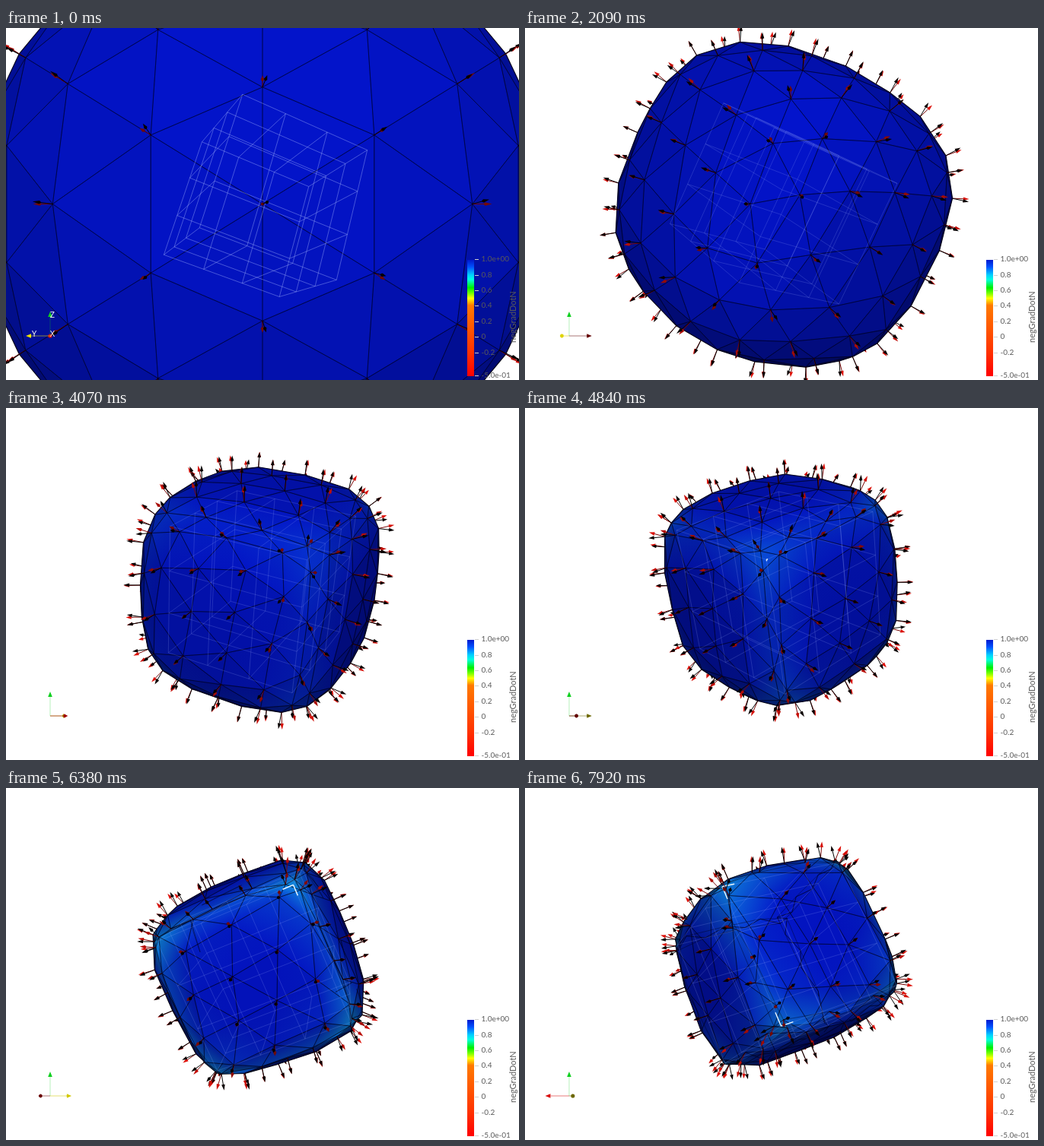
Recreate the animation shown at these times as an HTML page with a canvas. Size 674x463 px, loop 8000 ms.

```html
<!DOCTYPE html>
<html lang="en">
<head>
<meta charset="utf-8">
<title>Sphere shrinking onto a cube</title>
<style>
html, body { margin: 0; width: 100%; height: 100%; overflow: hidden; background: #fff; }
canvas { display: block; width: 674px; height: 463px; }
</style>
</head>
<body>
<canvas id="stage" width="674" height="463"></canvas>
<script>
const ctx = document.getElementById('stage').getContext('2d');
const LOOP = 8000, STEP = 110, TURN = 3.6 * Math.PI / 180;
const CX = 337, CY = 231.5, EYE = 864, UNIT = 88, ARROW = 0.235;
const LIGHT = [0, 0.3, 0.95];

// Vectors are [right, up, towards the viewer].
const dot = (a, b) => a[0] * b[0] + a[1] * b[1] + a[2] * b[2];
const add = (a, b, k = 1) => a.map((x, i) => x + k * b[i]);
const mul = (a, k) => a.map(x => x * k);
const unit = a => mul(a, 1 / (Math.hypot(...a) || 1));
const cross = (a, b) => [a[1] * b[2] - a[2] * b[1], a[2] * b[0] - a[0] * b[2], a[0] * b[1] - a[1] * b[0]];

// Cube axes at the start of the turn
const N = unit([-0.36, -0.24, -0.9]);
const V = unit(cross([-0.885, 0.36, 0.27], N));
const U = cross(N, V);
const AXES = [N, U, V];
const toCube = p => AXES.map(a => dot(p, a));
const fromCube = q => add(add(mul(N, q[0]), U, q[1]), V, q[2]);

function buildSphere(levels) {
  const phi = (1 + Math.sqrt(5)) / 2, verts = [];
  for (const s of [1, -1]) for (const t of [phi, -phi])
    verts.push([s, t, 0], [t, 0, s], [0, s, t]);
  const near = (i, j) => Math.hypot(...add(verts[i], verts[j], -1)) < 2.1;
  let faces = [];
  for (let i = 0; i < 12; i++) for (let j = i + 1; j < 12; j++) for (let k = j + 1; k < 12; k++)
    if (near(i, j) && near(j, k) && near(i, k)) {
      const n = cross(add(verts[j], verts[i], -1), add(verts[k], verts[i], -1));
      faces.push(dot(n, verts[i]) > 0 ? [i, j, k] : [i, k, j]);
    }
  verts.forEach((p, i) => { verts[i] = unit(p); });
  for (let l = 0; l < levels; l++) {
    const seen = {};
    const mid = (a, b) => {
      const key = Math.min(a, b) + ':' + Math.max(a, b);
      if (!(key in seen)) seen[key] = verts.push(unit(add(verts[a], verts[b]))) - 1;
      return seen[key];
    };
    faces = faces.flatMap(([a, b, c]) => {
      const ab = mid(a, b), bc = mid(b, c), ca = mid(c, a);
      return [[a, ab, ca], [ab, b, bc], [ca, bc, c], [ab, bc, ca]];
    });
  }
  return { dirs: verts.map(toCube), faces };
}
const sphere = buildSphere(2);

let cosA = 1, sinA = 0;
const spin = p => [p[0] * cosA - p[2] * sinA, p[1], p[2] * cosA + p[0] * sinA];
const view = q => spin(fromCube(q));
function project(p) {
  const k = UNIT * EYE / (EYE - p[2] * UNIT);
  return [CX + p[0] * k, CY - p[1] * k];
}

function line(a, b) {
  ctx.beginPath();
  ctx.moveTo(a[0], a[1]);
  ctx.lineTo(b[0], b[1]);
  ctx.stroke();
}
function tracePoly(pts) {
  pts.forEach((p, i) => i ? ctx.lineTo(p[0], p[1]) : ctx.moveTo(p[0], p[1]));
  ctx.closePath();
}
function disc(p, r) {
  ctx.beginPath();
  ctx.arc(p[0], p[1], r, 0, 7);
  ctx.fill();
}
function cone(base, tip, w) {
  const dx = tip[0] - base[0], dy = tip[1] - base[1], d = Math.hypot(dx, dy) || 1;
  const ox = -dy / d * w, oy = dx / d * w;
  ctx.beginPath();
  tracePoly([tip, [base[0] + ox, base[1] + oy], [base[0] - ox, base[1] - oy]]);
  ctx.fill();
}
const shaded = (rgb, k) => 'rgb(' + rgb.map(c => Math.round(c * k)).join() + ')';

function arrow(pos, dir, shaft, rgb) {
  const a = project(pos), b = project(add(pos, dir, ARROW * 0.66)), c = project(add(pos, dir, ARROW));
  ctx.strokeStyle = shaft;
  ctx.lineWidth = 1;
  line(a, b);
  ctx.fillStyle = shaded(rgb, Math.max(0.5, Math.sqrt(1 - Math.min(1, dir[2] ** 2))));
  cone(b, c, 2.3);
  disc(b, 2.1 * Math.abs(dir[2]));
}
function arrows(pt) {
  arrow(pt.pos, pt.norm, '#780606', [222, 18, 10]);
  arrow(pt.pos, pt.grad, '#000', [10, 0, 0]);
}

// Vertices sink onto a rounded cube that gets squarer, drifting against its normal.
function shape(f) {
  const size = 1.22 + 2.71 * Math.exp(-0.0545 * f), p = 2 + 0.034 * f;
  const drift = 0.25 + 0.005 * f;
  const glow = Math.min(1, Math.max(0, (f - 26) / 36));
  const normal = d => unit(d.map(x => Math.sign(x) * Math.pow(Math.abs(x), p - 1)));
  const pts = sphere.dirs.map(d0 => {
    const n0 = normal(d0);
    const d = unit(add(d0, add(n0, d0, -dot(n0, d0)), -drift));
    const r = size * Math.pow(d.reduce((s, x) => s + Math.pow(Math.abs(x), p), 0), -1 / p);
    const q = mul(d, r), n = normal(d);
    const gap = q.map(x => x - Math.max(-1, Math.min(1, x)));
    const m = d.map(Math.abs).sort((a, b) => b - a);
    const m2 = m[1] / m[0], m3 = m[2] / m[0];
    const pos = view(q), norm = view(n);
    return {
      pos, norm,
      grad: view(unit(add(unit(gap), n, 0.3))),
      heat: glow * (0.35 * m2 ** 5 + 0.65 * m2 ** 2 * m3 ** 2),
      xy: project(pos),
      front: dot(norm, add([0, 0, EYE / UNIT], pos, -1)) > 0
    };
  });
  return { pts, corner: size * Math.pow(3, -1 / p) };
}

const COLD = [3, 20, 204], WARM = [20, 180, 235];
const tint = (h, k) => shaded(COLD.map((c, i) => c + (WARM[i] - c) * h), k);

function faceFill(tri, shade) {
  const [a, b, c] = [...tri].sort((p, q) => p.heat - q.heat);
  const span = c.heat - a.heat;
  if (span < 0.015) return tint(b.heat, shade);
  const x1 = b.xy[0] - a.xy[0], y1 = b.xy[1] - a.xy[1], x2 = c.xy[0] - a.xy[0], y2 = c.xy[1] - a.xy[1];
  const det = x1 * y2 - x2 * y1, h = b.heat - a.heat;
  if (Math.abs(det) < 1) return tint(b.heat, shade);
  const gx = (h * y2 - span * y1) / det, gy = (span * x1 - h * x2) / det;
  const k = span / (gx * gx + gy * gy);
  const g = ctx.createLinearGradient(a.xy[0], a.xy[1], a.xy[0] + gx * k, a.xy[1] + gy * k);
  g.addColorStop(0, tint(a.heat, shade));
  g.addColorStop(1, tint(c.heat, shade));
  return g;
}

function drawSurface(pts) {
  const tris = sphere.faces.map(f => f.map(i => pts[i])).filter(([a, b, c]) =>
    (b.xy[0] - a.xy[0]) * (c.xy[1] - a.xy[1]) - (c.xy[0] - a.xy[0]) * (b.xy[1] - a.xy[1]) < 0);
  const outline = () => {
    ctx.beginPath();
    tris.forEach(t => tracePoly(t.map(p => p.xy)));
    ctx.stroke();
  };
  ctx.lineJoin = 'round';
  ctx.strokeStyle = '#000';
  ctx.lineWidth = 2;
  outline();
  for (const t of tris) {
    const [a, b, c] = t.map(p => p.pos);
    const n = unit(cross(add(b, a, -1), add(c, a, -1)));
    ctx.fillStyle = ctx.strokeStyle = faceFill(t, 0.4 + 0.6 * Math.max(0, dot(n, LIGHT)));
    ctx.beginPath();
    tracePoly(t.map(p => p.xy));
    ctx.fill();
    ctx.lineWidth = 0.5;
    ctx.stroke();
  }
  ctx.strokeStyle = 'rgba(0,0,25,.6)';
  ctx.lineWidth = 0.7;
  outline();
}

function drawCube(f, corner) {
  ctx.strokeStyle = `rgba(170,185,255,${f < 4 ? 0.5 : 0.23})`;
  ctx.lineWidth = 0.8;
  const put = (axis, x, y, z) => {
    const q = [];
    q[axis] = x; q[(axis + 1) % 3] = y; q[(axis + 2) % 3] = z;
    return project(view(q));
  };
  for (let axis = 0; axis < 3; axis++)
    for (let i = 0; i < 4; i++) for (let j = 0; j < 4; j++)
      if (i % 3 === 0 || j % 3 === 0) {
        const y = i / 1.5 - 1, z = j / 1.5 - 1;
        line(put(axis, -1, y, z), put(axis, 1, y, z));
      }

  // Corners that break through the surface
  const leg = Math.max(0, 1.08 - corner) * 2.2;
  if (!leg) return;
  ctx.strokeStyle = '#eef8ff';
  ctx.lineWidth = 1.4;
  for (let m = 0; m < 8; m++) {
    const q = [0, 1, 2].map(i => m >> i & 1 ? 1 : -1);
    const p = view(q);
    if (p[2] < 1.1) continue;
    const depth = AXES.map((a, i) => spin(a)[2] * q[i]);
    const facing = depth.indexOf(Math.max(...depth));
    for (let i = 0; i < 3; i++) if (i !== facing) {
      const end = [...q];
      end[i] *= 1 - leg;
      line(project(p), project(view(end)));
    }
  }
}

function drawTriad() {
  const O = [58, 405];
  const axes = [
    { name: 'X', dir: spin([0, 0, -1]), rgb: [220, 12, 12] },
    { name: 'Y', dir: spin([-1, 0, 0]), rgb: [240, 228, 0] },
    { name: 'Z', dir: [0, 1, 0], rgb: [16, 208, 32] }
  ].sort((a, b) => a.dir[2] - b.dir[2]);
  const at = (d, k) => [O[0] + d[0] * k, O[1] - d[1] * k];
  ctx.font = '11px "Open Sans", Arial, sans-serif';
  ctx.textAlign = 'center';
  for (const { name, dir, rgb } of axes) {
    // A headlight: bright on the side of a near cone and on the base of a far one
    const z = dir[2], lit = z < -0.05 ? -z : Math.sqrt(1 - Math.min(1, z * z));
    const color = shaded(rgb, Math.max(0.45, lit));
    ctx.strokeStyle = color;
    ctx.globalAlpha = name === 'Z' ? 0.3 : 0.55;
    ctx.lineWidth = 1;
    line(O, at(dir, 25));
    ctx.globalAlpha = 1;
    ctx.fillStyle = color;
    cone(at(dir, 25), at(dir, 32), 2.8);
    disc(at(dir, 26), 2.6 * Math.abs(z));
  }
  if (sinA < 0.3 && cosA > 0.95) {
    ctx.fillStyle = '#fff';
    for (const { name, dir } of axes) {
      const p = at(dir, name === 'Z' ? 28 : 24);
      ctx.fillText(name, p[0] + 3, p[1] + (name === 'Z' ? 4 : 1));
    }
  }
}

const RAMP = [[0, '#0018cc'], [0.06, '#0050ff'], [0.13, '#00d0ff'], [0.17, '#00ffe0'], [0.24, '#00f000'],
  [0.29, '#80ff00'], [0.33, '#ffff00'], [0.39, '#ff7a00'], [0.6, '#ff5500'], [0.8, '#ff3000'], [1, '#ff0000']];
const TICKS = [['1.0e+00', 304], ['0.8', 324.5], ['0.6', 345], ['0.4', 365], ['0.2', 385.5],
  ['0', 406], ['-0.2', 426.5], ['-5.0e-01', 457]];
function drawLegend() {
  const g = ctx.createLinearGradient(0, 305, 0, 458);
  RAMP.forEach(([k, c]) => g.addColorStop(k, c));
  ctx.fillStyle = g;
  ctx.fillRect(606, 305, 9, 153);
  ctx.font = '10px Lato, sans-serif';
  ctx.textAlign = 'left';
  for (const [label, y] of TICKS) {
    ctx.fillStyle = '#d0d0d0';
    ctx.fillRect(616, Math.round(y), 5, 1);
    ctx.fillStyle = '#5a5a5a';
    ctx.fillText(label, 624.5, y + 3);
  }
  ctx.save();
  ctx.translate(670, 414);
  ctx.rotate(-Math.PI / 2);
  ctx.font = '11px Lato, sans-serif';
  ctx.fillText('negGradDotN', 0, 0);
  ctx.restore();
}

function draw(f) {
  cosA = Math.cos(f * TURN);
  sinA = Math.sin(f * TURN);
  ctx.fillStyle = '#fff';
  ctx.fillRect(0, 0, 674, 463);
  const { pts, corner } = shape(f);
  pts.filter(p => !p.front).forEach(arrows);
  drawSurface(pts);
  drawCube(f, corner);
  pts.filter(p => p.front).sort((a, b) => a.pos[2] - b.pos[2]).forEach(arrows);
  drawTriad();
  drawLegend();
}

const start = performance.now();
function tick() {
  draw(Math.floor((performance.now() - start) % LOOP / STEP));
  requestAnimationFrame(tick);
}
tick();
</script>
</body>
</html>
```
